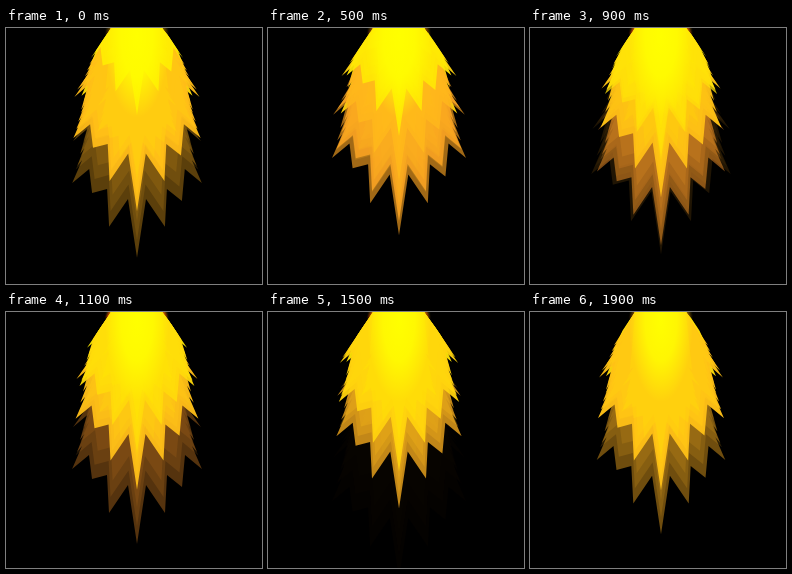
An HTML page that plays this animation: 256 by 256 pixels, repeating every 2000 ms.

```html
<!DOCTYPE html>
<html lang="en">
<head>
<meta charset="utf-8">
<title>Flame</title>
<style>
  html, body { margin: 0; width: 100%; height: 100%; overflow: hidden; background: #000; }
  svg { display: block; width: 100vw; height: 100vh; }
</style>
</head>
<body>
<svg viewBox="0 0 256 256">
  <defs>
    <radialGradient id="glow">
      <stop offset="0" stop-color="#ff0" stop-opacity="1"/>
      <stop offset=".5" stop-color="#ff0" stop-opacity=".8"/>
      <stop offset="1" stop-color="#ff0" stop-opacity="0"/>
    </radialGradient>
    <filter id="soft"><feGaussianBlur stdDeviation="1.2"/></filter>
  </defs>
  <path id="rim" d="M104 -3H158L161 6H100Z" fill="#d82000" filter="url(#soft)"/>
  <g id="flames"></g>
  <ellipse cx="131" cy="8" rx="32" ry="82" fill="url(#glow)"/>
</svg>
<script>
const LOOP = 2000, STEP = 100, CX = 131;
const NS = 'http://www.w3.org/2000/svg';
const group = document.getElementById('flames');
const rim = document.getElementById('rim');

// Half outline from the tip upwards: spikes at even places, notches at odd ones.
const OUTLINE = [
  [0, 75], [9, 16], [28, 44], [30, 6], [45, 14], [48, -14], [65, 0],
  [55, -23], [60, -17], [53, -35], [57, -29], [50, -54], [64, -42],
  [50, -62], [56, -56], [45, -74], [51, -69]
];

const clamp = (v, lo, hi) => Math.min(hi, Math.max(lo, v));
const ramp = (v, from, to) => clamp((v - from) / (to - from), 0, 1);
const mix = (a, b, k) => a.map((v, i) => Math.round(v + (b[i] - v) * k));

const YOUNG = [255, 236, 4], MID = [255, 206, 16];
const tint = (age, old) =>
  `rgb(${mix(mix(YOUNG, MID, ramp(age, 1.2, 2.7)), old, ramp(age, 2.6, 3.5))})`;

// y is the height of the widest spikes, width their distance from the axis.
const slim = {
  fall: age => 50 + 35.5 * (age - 1.5) + 20 * Math.max(0, age - 3.1) ** 2,
  width: y => y < 105 ? 45 + y * 0.155 : 61.3 + (y - 105) * 0.07,
  fade: age => 1 - ramp(age, 3.25, 4.45),
  mature: 0
};
const wide = {
  fall: age => 50 + 40 * age,
  width: y => 60 + (y - 89) * 0.17,
  fade: age => ramp(age, 0, 0.5) * (1 - ramp(age, 1.75, 2.5)),
  mature: 1.5
};

const emitters = [
  { kind: slim, offset: 0, old: [255, 178, 32] },
  { kind: slim, offset: 0.93, old: [255, 152, 44] },
  { kind: wide, offset: -0.5, old: [255, 166, 36] }
];

function shape(y, scale) {
  const half = side => OUTLINE.map(([px, py], i) => {
    const tilt = i === 4 ? side * 4 : 0;
    const ay = y + (py + tilt) * scale;
    if (ay <= 0) return [CX + side * 25, 0];
    return [CX + side * Math.min(px * scale, 26 + ay * 0.67), ay];
  });
  return [...half(1), [CX + 25, 0], [CX - 26, 0], ...half(-1).reverse()]
    .map(p => p.map(v => v.toFixed(1)).join()).join(' ');
}

const pool = [];
let used = 0;
function poly(points, fill, opacity) {
  let el = pool[used];
  if (!el) {
    el = document.createElementNS(NS, 'polygon');
    pool.push(el);
    group.append(el);
  }
  used++;
  el.setAttribute('points', points);
  el.setAttribute('fill', fill);
  el.setAttribute('opacity', opacity.toFixed(3));
}

function flame({ kind, old, age }) {
  const fade = kind.fade(age);
  if (fade <= 0) return;
  const ripe = age + kind.mature;
  const layer = (lag, size, strength, fill) => {
    const y = kind.fall(age - lag);
    if (y > 0) poly(shape(y, kind.width(y) / 65 * size), fill, fade * strength);
  };
  layer(0, 1, 0.95, tint(ripe, old));
  layer(0.2, 0.96, 0.35, tint(ripe - 0.2, old));
  layer(0.42, 0.9, 0.3, tint(ripe - 0.42, old));
  layer(0.15, 0.64, 0.3 * (1 - ramp(ripe, 2.6, 3.6)), '#ffe800');
}

function draw(ms) {
  const t = ms / 1000;
  used = 0;
  emitters
    .flatMap(e => [0, 1, 2].map(k => ({ ...e, age: t + e.offset + 2 * k })))
    .sort((a, b) => b.age - a.age)
    .forEach(flame);
  for (let i = used; i < pool.length; i++) pool[i].setAttribute('opacity', 0);
  rim.setAttribute('opacity', (0.55 - 0.35 * Math.cos((t - 0.15) * Math.PI)).toFixed(2));
}

function tick() {
  draw(Math.floor(performance.now() % LOOP / STEP) * STEP);
  requestAnimationFrame(tick);
}
tick();
</script>
</body>
</html>
```
